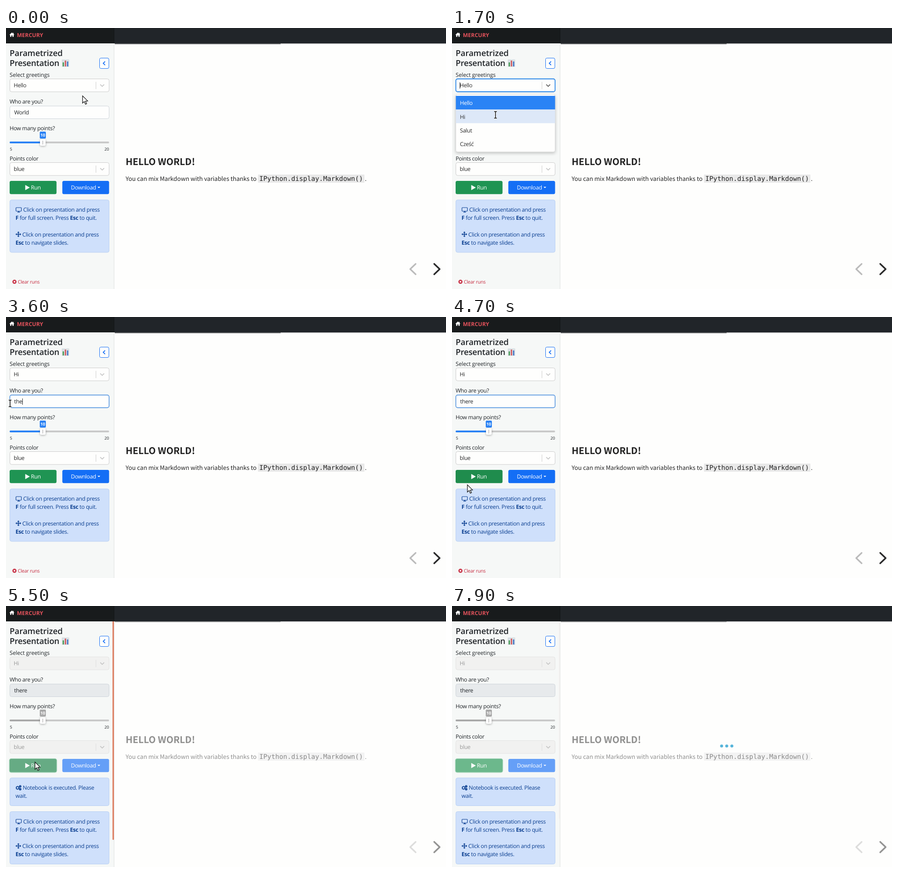
An HTML page with a canvas for the animation above (8 s loop, 971 by 577 pixels).

```html
<!DOCTYPE html>
<html lang="en">
<head>
<meta charset="utf-8">
<title>Parametrized Presentation</title>
<style>
html, body { margin: 0; width: 100%; height: 100%; overflow: hidden; background: #fefefd; }
canvas { display: block; }
</style>
</head>
<body>
<canvas id="stage" width="971" height="577"></canvas>
<script>
const ctx = document.getElementById('stage').getContext('2d');
const LOOP = 8000;
const UI = '"Open Sans", "Noto Sans", sans-serif';
const SLIDE = '"Noto Sans CJK JP", "Noto Sans CJK SC", "Noto Sans CJK", "Noto Sans", sans-serif';
const MONO = '"DejaVu Sans Mono", monospace';
const INK = '#212529', PAPER = '#fefefd', BLUE = '#146ef5', NAVY = '#0b3f91';

// Pointer keyframes: time, x, y
const PATH = [
  [0, 169, 150], [100, 169, 150], [200, 179, 146], [300, 179, 146], [400, 165, 136],
  [500, 130, 131], [700, 130, 131], [800, 122, 134], [1500, 94, 205], [1600, 94, 205],
  [1700, 96, 192], [1900, 96, 194], [2100, 52, 190], [2200, 52, 190], [2300, 48, 188],
  [2500, 12, 189], [2700, 7, 190], [2900, 9, 191], [4200, 9, 191], [4300, 10, 205],
  [4700, 34, 371], [5000, 64, 345], [8000, 64, 345]
];
const TYPED = [3400, 3500, 3600, 3800, 3900];
const OPTIONS = ['Hello', 'Hi', 'Salut', 'Cześć'];

const clamp = v => Math.max(0, Math.min(1, v));

function pointerAt(t) {
  const i = PATH.findIndex(k => k[0] > t);
  const [t0, x0, y0] = PATH[i - 1], [t1, x1, y1] = PATH[i];
  const k = (t - t0) / (t1 - t0);
  return { x: x0 + (x1 - x0) * k, y: y0 + (y1 - y0) * k };
}

function rect(x, y, w, h, color) {
  ctx.fillStyle = color;
  ctx.fillRect(x, y, w, h);
}

function box(x, y, w, h, r, fill, stroke, line = 1) {
  ctx.beginPath();
  ctx.roundRect(x, y, w, h, r);
  if (fill) { ctx.fillStyle = fill; ctx.fill(); }
  if (stroke) { ctx.strokeStyle = stroke; ctx.lineWidth = line; ctx.stroke(); }
}

function shadow(color, blur, dy) {
  ctx.shadowColor = color;
  ctx.shadowBlur = blur;
  ctx.shadowOffsetY = dy;
}
const noShadow = () => shadow('transparent', 0, 0);

function text(s, x, y, o = {}) {
  const { size = 12.3, color = INK, weight = 500, font = UI, gap = -0.36, align = 'left' } = o;
  ctx.font = `${weight} ${size}px ${font}`;
  ctx.letterSpacing = gap + 'px';
  ctx.textAlign = align;
  ctx.fillStyle = color;
  ctx.fillText(s, x, y);
  return ctx.measureText(s).width;
}

// Alternates regular and bold runs, split at asterisks
function rich(s, x, y, color) {
  s.split('*').forEach((part, i) => {
    if (part) x += text(part, x, y, { color, weight: i % 2 ? 700 : 500 });
  });
}

function trace(points, x = 0, y = 0) {
  ctx.beginPath();
  points.forEach(([px, py]) => ctx.lineTo(x + px, y + py));
}

function line(points, color, width, x, y) {
  trace(points, x, y);
  ctx.strokeStyle = color;
  ctx.lineWidth = width;
  ctx.stroke();
}

function shape(points, color, x, y) {
  trace(points, x, y);
  ctx.closePath();
  ctx.fillStyle = color;
  ctx.fill();
}

function disc(x, y, r, color) {
  ctx.beginPath();
  ctx.arc(x, y, r, 0, 7);
  ctx.fillStyle = color;
  ctx.fill();
}

function header() {
  rect(0, 0, 971, 34, '#212529');
  rect(0, 0, 239, 34, '#181b1c');
  rect(238, 0, 1, 34, '#121415');
  shape([[0, 5], [5.5, 0], [8, 2.2], [8, 0.8], [9.4, 0.8], [9.4, 3.5], [11, 5], [9.4, 5.4],
    [9.4, 9.5], [6.7, 9.5], [6.7, 6.2], [4.4, 6.2], [4.4, 9.5], [1.7, 9.5], [1.7, 5.4]], '#fff', 7.5, 10);
  text('MERCURY', 24, 20, { size: 12, weight: 700, color: '#e2525b', gap: 0 });
}

function slide(fade) {
  const o = { font: SLIDE, color: '#222', gap: 0, size: 13.15, weight: 400 };
  ctx.globalAlpha = fade;
  rect(240, 34, 731, 1.6, '#c6c6c6');
  rect(240, 34, 366, 1.8, '#606264');
  text('HELLO WORLD!', 264, 302.5, { ...o, size: 20.4, weight: 700 });
  text('You can mix Markdown with variables thanks to', 264, 338, o);
  box(556, 324, 235, 18, 1, '#e9e9e9');
  text('IPython.display.Markdown()', 559, 338, { ...o, size: 14.63, font: MONO });
  text('.', 792, 338, o);
  ctx.lineCap = ctx.lineJoin = 'round';
  line([[904, 521.5], [892, 533], [904, 544.5]], '#bbb', 3.4);
  line([[945, 521.5], [957, 533], [945, 544.5]], '#2a2a2a', 3.6);
  ctx.lineCap = 'butt';
  ctx.lineJoin = 'miter';
  ctx.globalAlpha = 1;
}

function select(y, value, state) {
  const off = state === 'off', focus = state === 'focus';
  const edge = { off: '#e3e3e2', focus: '#2684e8', hover: '#b0b0b0' }[state] || '#ccc';
  box(8.5, y + 0.5, 219, 28.5, 4, off ? '#f1f1f0' : PAPER, edge, focus ? 1.8 : 1);
  text(value, 17, y + 19, { color: off ? '#999' : '#2b2b2b' });
  rect(198, y + 7, 1, 16, off ? '#dedede' : '#ccc');
  line([[208, 12.8], [212.3, 17], [216.6, 12.8]], focus ? '#555' : '#c4c4c4', 1.7, 0, y);
}

function heading() {
  const o = { size: 18.2, weight: 600, gap: -0.1 };
  text('Parametrized', 8, 62, o);
  text('Presentation', 8, 84, { ...o, gap: -0.25 });
  box(123, 69.5, 16.5, 16.5, 1, '#d9e0e4');
  rect(125, 76, 2.8, 9, '#4a9a55');
  rect(129.8, 72, 2.8, 13, '#d2555a');
  rect(134.6, 74, 2.8, 11, '#3f74c4');
  box(206.5, 66.5, 20.5, 23, 3, PAPER, BLUE);
  line([[218.7, 73.8], [214.6, 78], [218.7, 82.2]], BLUE, 1.8);
}

function nameInput(t, busy) {
  const n = TYPED.filter(k => t >= k).length;
  const value = n ? 'there'.slice(0, n) : 'World';
  const focus = t >= 2300 && !busy;
  box(8.5, 172.5, 219, 28, 4, busy ? '#e7eaec' : PAPER, focus ? '#3c86dc' : '#ced4da', focus ? 1.4 : 1);
  const picked = t >= 2300 && !n;
  const w = text(value, 18, 190.5);
  if (picked) {
    const from = t < 2400 ? 43 : t < 2500 ? 30 : 18;
    rect(from, 179, 18 + w - from, 15, '#e38468');
    ctx.save();
    ctx.beginPath();
    ctx.rect(from, 178, 60, 18);
    ctx.clip();
    text(value, 18, 190.5, { color: '#fff' });
    ctx.restore();
  } else if (n && t < 4400) {
    rect(Math.round(18 + w), 180, 1, 14, INK);
  }
}

function slider(busy) {
  const tone = busy ? '#a9a9a9' : '#2b82f4';
  box(8, 251, 219.5, 4, 2, '#c9c9c9');
  box(8, 251, 73, 4, 2, tone);
  shadow('rgba(0,0,0,.35)', 4, 1);
  box(75, 246, 12.5, 14.5, 3, '#fff');
  noShadow();
  rect(80.6, 249, 1.2, 8.5, '#aaa');
  box(74.5, 229, 13.5, 15.5, 2, tone);
  text('10', 81.2, 240, { size: 9, weight: 700, color: '#fff', align: 'center', gap: 0 });
  text('5', 8.5, 271, { size: 9, gap: 0 });
  text('20', 227.5, 271, { size: 9, gap: 0, align: 'right' });
}

function buttons(t, busy) {
  const hover = t >= 4600 && t < 6000;
  if (busy) box(6.7, 336.7, 106, 32, 5, '#add9c0');
  const green = busy ? (hover ? '#66ab84' : '#6cb88c') : (hover ? '#1f8c4d' : '#1f9453');
  box(8, 338, 103.5, 29.3, 3.5, green);
  shape([[42.5, 347], [52.5, 352.8], [42.5, 358.5]], '#fff');
  text('Run', 55, 357, { color: '#fff' });
  box(124.3, 338, 103.2, 29.3, 3.5, busy ? '#659ff7' : BLUE);
  text('Download', 143.3, 357, { color: '#fff' });
  shape([[202, 351], [208, 351], [205, 354]], '#fff');
}

function note(y, h) {
  box(8.5, y + 0.5, 219, h, 4, '#cfe0fb', '#b7cff3');
}

function gear(x, y, r) {
  ctx.strokeStyle = NAVY;
  ctx.lineWidth = 1.5;
  ctx.beginPath();
  ctx.arc(x, y, r, 0, 7);
  ctx.stroke();
  for (let i = 0; i < 8; i++) {
    const c = Math.cos(i * Math.PI / 4), s = Math.sin(i * Math.PI / 4);
    line([[c * r, s * r], [c * (r + 1.7), s * (r + 1.7)]], NAVY, 1.2, x, y);
  }
}

function hints(y) {
  note(y, 116);
  box(22, y + 17.5, 12, 8, 1.2, null, NAVY, 1.2);
  rect(27, y + 25.5, 2, 2, NAVY);
  rect(25, y + 27, 6, 1.2, NAVY);
  rich('Click on presentation and press', 38, y + 26.5, NAVY);
  rich('*F* for full screen. Press *Esc* to quit.', 21, y + 44.5, NAVY);
  const cx = 27.3, cy = y + 76.5;
  rect(cx - 4, cy - 0.8, 8, 1.6, NAVY);
  rect(cx - 0.8, cy - 4, 1.6, 8, NAVY);
  for (let i = 0; i < 4; i++) {
    ctx.save();
    ctx.translate(cx, cy);
    ctx.rotate(i * Math.PI / 2);
    shape([[6.3, 0], [3.6, -2.6], [3.6, 2.6]], NAVY);
    ctx.restore();
  }
  rich('Click on presentation and press', 36, y + 81, NAVY);
  rich('*Esc* to navigate slides.', 21, y + 99, NAVY);
}

function clearRuns() {
  const red = '#c5283d';
  disc(18.7, 561, 4.5, red);
  line([[17, 559.3], [20.4, 562.7]], '#fff', 1.3);
  line([[20.4, 559.3], [17, 562.7]], '#fff', 1.3);
  text('Clear runs', 26, 565, { size: 10.6, color: red, gap: -0.27 });
}

function menu(y) {
  shadow('rgba(0,0,0,.22)', 7, 3);
  box(8, 146.5, 220, 127.5, 4, PAPER);
  noShadow();
  box(8.5, 146.5, 219, 127.5, 4, null, '#d9d9d9');
  const over = Math.floor((y - 150) / 30.2);
  OPTIONS.forEach((name, i) => {
    const top = 150 + i * 30.2;
    if (i === 0) rect(8.5, top, 219, 30.2, '#2a83f5');
    else if (i === over) rect(8.5, top, 219, 30.2, '#dde8f8');
    text(name, 17.5, top + 20.3, { color: i ? '#2b2b2b' : '#fff' });
  });
}

function sidebar(t, p) {
  const busy = t >= 5200;
  const open = t >= 800 && t < 1900;
  const state = busy ? 'off' : t >= 800 && t < 2300 ? 'focus' : t >= 500 && t < 800 ? 'hover' : '';
  rect(0, 34, 239, 543, '#f6f8f7');
  rect(238, 34, 1, 543, '#dfe1e0');
  heading();
  text('Select greetings', 8, 107.5, { gap: -0.1 });
  select(112, t < 1900 ? 'Hello' : 'Hi', state);
  if (state === 'focus' && Math.floor((t + 300) / 500) % 2 === 0) rect(17, 120, 1, 14, INK);
  text('Who are you?', 8, 167);
  nameInput(t, busy);
  text('How many points?', 8, 226);
  slider(busy);
  text('Points color', 8, 293);
  select(297, 'blue', busy ? 'off' : '');
  buttons(t, busy);
  if (busy) {
    note(379.5, 61.5);
    gear(25.5, 402, 2.7);
    gear(31.3, 398.8, 1.3);
    gear(31.3, 405, 1.3);
    rich('Notebook is executed. Please', 37, 406, NAVY);
    rich('wait.', 21, 424, NAVY);
    hints(454);
    ctx.globalAlpha = 1 - 0.97 * clamp((t - 6800) / 1100);
    box(235, 34, 3.2, t < 6000 ? 483 : 436, [0, 0, 2, 2], '#e08265');
    ctx.globalAlpha = 1;
  } else {
    hints(379.5);
    clearRuns();
  }
  if (open) menu(p.y);
}

// Three dots fade in together, then slide away one after another from the right
function spinner(t) {
  const u = (t - 6000) % 1800;
  const show = 1 - (1 - clamp((u + 30) / 350)) ** 3;
  for (let i = 0; i < 3; i++) {
    const k = clamp((u - 420 - (2 - i) * 216) / 400);
    ctx.globalAlpha = show * (1 - k ** 1.1);
    disc(595 + i * 11.3 + 16 * k, 309.5, 3.3, '#1f9bce');
  }
  ctx.globalAlpha = 1;
}

function arrow(x, y) {
  const p = [[0, 0], [0, 16], [3.8, 12.6], [6.4, 18.6], [9, 17.5], [6.4, 11.6], [11.3, 11.4]];
  shape(p, '#fff', x, y);
  ctx.strokeStyle = '#151515';
  ctx.lineWidth = 1.3;
  ctx.stroke();
}

function beam(x, y) {
  for (const [color, w] of [['#fff', 3.4], ['#151515', 1.6]]) {
    line([[0, -7], [0, 7]], color, w, x, y);
    line([[-3, -7.3], [3, -7.3]], color, w, x, y);
    line([[-3, 7.3], [3, 7.3]], color, w, x, y);
  }
}

function draw(ms) {
  const t = Math.floor(ms / 100) * 100;
  const p = pointerAt(t);
  ctx.textRendering = 'geometricPrecision';
  rect(0, 0, 971, 577, PAPER);
  slide(1 - 0.5 * clamp((t - 5100) / 400));
  sidebar(t, p);
  header();
  if (t >= 6000) spinner(t);
  else if (t > 800 && t < 4400) beam(p.x, p.y);
  else arrow(p.x, p.y);
}

const start = performance.now();
function tick() {
  draw((performance.now() - start) % LOOP);
  requestAnimationFrame(tick);
}
tick();
</script>
</body>
</html>
```
